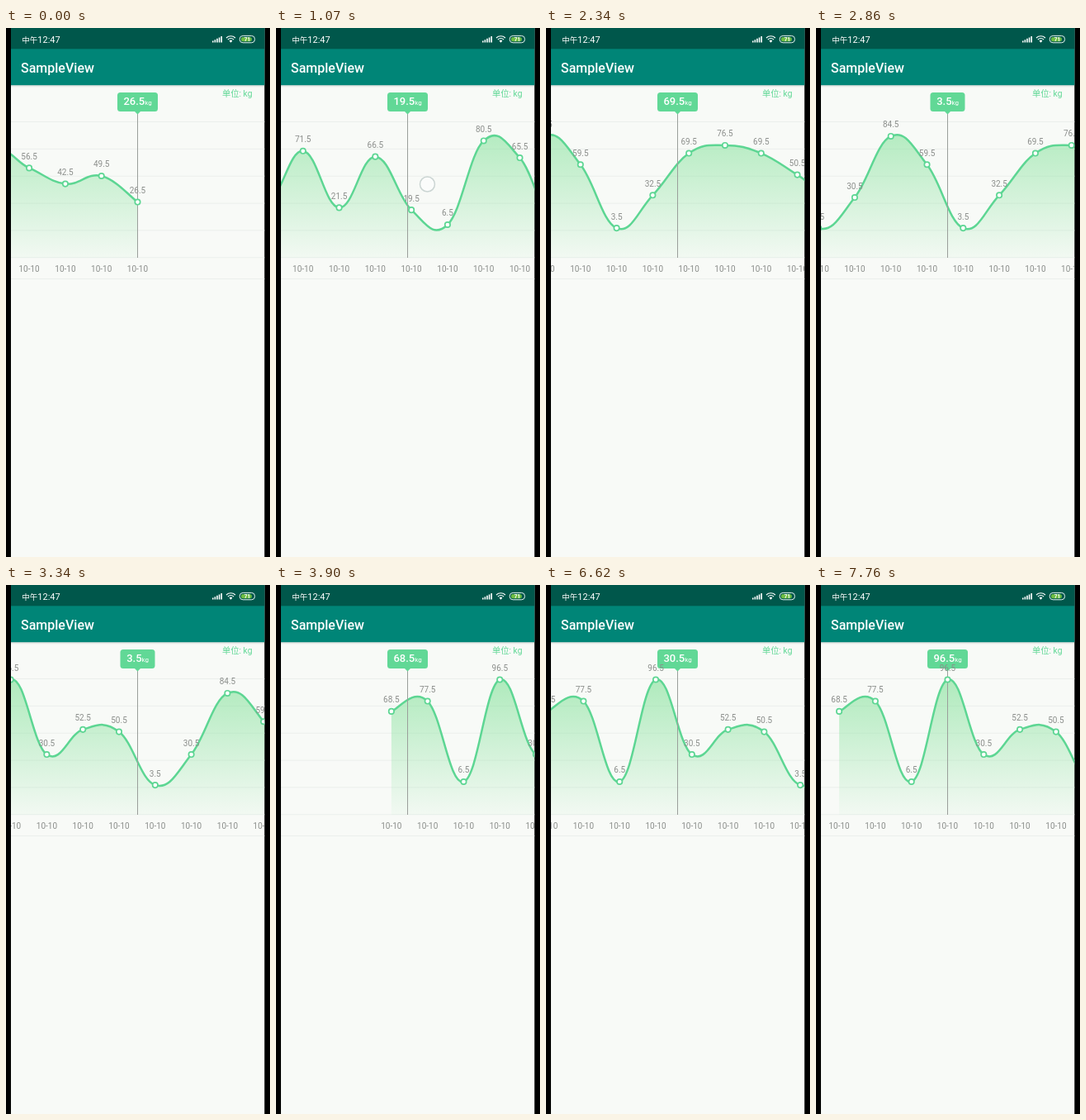
An HTML page for the animation above (8 s loop, 320x640 px).

```html
<!DOCTYPE html>
<html lang="zh">
<head>
<meta charset="utf-8">
<title>SampleView</title>
<style>
  html, body { margin: 0; width: 100%; height: 100%; overflow: hidden; background: #000; }
  svg { display: block; width: 100vw; height: 100vh; }
  text { font-family: Roboto, "Noto Sans CJK SC", "Noto Sans CJK", sans-serif; }
  .label { font-size: 10px; fill: #8b8e8b; text-anchor: middle; }
  .value { font-size: 13px; font-weight: 500; fill: #fff; text-anchor: middle; }
  .grid { stroke: #ebefec; }
  .dot { fill: #fff; stroke: #5dd693; stroke-width: 1.7; }
</style>
</head>
<body>
<svg viewBox="0 0 320 640">
  <defs>
    <linearGradient id="fade" gradientUnits="userSpaceOnUse" x1="0" y1="110" x2="0" y2="278">
      <stop offset="0" stop-color="#7fe096" stop-opacity=".62"/>
      <stop offset="1" stop-color="#7fe096" stop-opacity=".05"/>
    </linearGradient>
    <linearGradient id="shade" x1="0" y1="0" x2="0" y2="1">
      <stop offset="0" stop-color="#000" stop-opacity=".14"/>
      <stop offset="1" stop-color="#000" stop-opacity="0"/>
    </linearGradient>
    <clipPath id="screen"><rect x="6" width="307.3" height="640"/></clipPath>
  </defs>
  <g clip-path="url(#screen)">
    <rect width="320" height="640" fill="#f8faf7"/>
    <g id="grid"></g>
    <g class="scroll" id="curve"></g>
    <path d="M159.5 101V278" stroke="#9b9f9b"/>
    <g fill="#61d896">
      <rect id="bubble" y="78" height="23" rx="3.5"/>
      <path d="M155.5 100.5h8l-4 4z"/>
    </g>
    <text class="value" x="159.6" y="93"><tspan id="amount"></tspan><tspan font-size="8" font-weight="400">kg</tspan></text>
    <g class="scroll" id="points"></g>
    <text x="298.5" y="82.7" font-size="10.3" fill="#61d896" text-anchor="end">单位: kg</text>
    <rect y="69" width="320" height="3" fill="url(#shade)"/>
    <rect width="320" height="69.2" fill="#008577"/>
    <rect width="320" height="25.3" fill="#00574b"/>
    <text x="18" y="53.5" font-size="16" font-weight="500" fill="#fff">SampleView</text>
    <g fill="#fff">
      <text x="19.3" y="18" font-size="11"><tspan font-size="9.5">中午</tspan>12:47</text>
      <path d="M250 15.5h1.6v2H250zM252.6 14.2h1.6v3.3h-1.6zM255.2 12.8h1.6v4.7h-1.6zM257.8 11.4h1.6v6.1h-1.6zM260.4 10h1.6v7.5h-1.6z"/>
      <path d="M270.6 15.4a2.6 2.6 0 0 1 3.8 0l-1.9 2.3z"/>
      <path d="M267 12a8 8 0 0 1 11 0M268.9 14a5.4 5.4 0 0 1 7.2 0" fill="none" stroke="#fff" stroke-width="1.1"/>
      <rect x="283.2" y="9.4" width="18.4" height="8.4" rx="4" fill="none" stroke="#e4f0ed"/>
      <rect x="284.9" y="11" width="13" height="5.2" rx="2.5" fill="#6fbe45"/>
      <text x="292.4" y="15.9" font-size="6.5" font-weight="700" text-anchor="middle">71</text>
    </g>
    <circle id="touch" r="9" fill="#fff" fill-opacity=".55" stroke="#cbd5d3" stroke-width="1.5"/>
  </g>
</svg>
<script>
const LOOP = 8000, STEP = 43.8, CENTER = 159.5, BASE = 278, BEND = 0.2;

// the chart's readings, oldest first
const values = [68, 77, 6, 96, 30, 52, 50, 3, 30, 84, 59, 3, 32, 69, 76, 69, 50, 30, 36, 52, 32,
  55, 94, 79, 28, 71, 21, 66, 19, 6, 80, 65, 9, 69, 56, 42, 49, 26].map(v => v + 0.5);
const LAST = values.length - 1;

// a swipe drags for its first quarter, then flings to rest at index "to"
const swipe = (start, end, to, x, y) =>
  ({ start, end, to, x, y, down: start, up: start + (end - start) / 4, drag: STEP });
// a tap on the next point scrolls it to the center on release
const tap = (start, i) =>
  ({ start, end: start + 310, to: i + 1, x: CENTER + STEP + 4, y: 210, down: start - 100, up: start, drag: 0 });

const moves = [
  swipe(380, 980, 28.43, 100, 190),
  swipe(980, 1620, 21.6, 160, 189),
  swipe(1620, 2860, 10.57, 185, 282),
  swipe(2870, 4265, 0, 120, 210),
  ...[4520, 5240, 5760, 6480].map(tap),
  swipe(7140, 7760, 3, 140, 208)
];

const $ = id => document.getElementById(id);
const add = (parent, tag, attrs, text = '') => {
  const el = document.createElementNS('http://www.w3.org/2000/svg', tag);
  for (const key in attrs) el.setAttribute(key, attrs[key]);
  el.textContent = text;
  parent.append(el);
};
const clamp = (v, low, high) => Math.max(low, Math.min(high, v));

const xy = values.map((v, i) => [i * STEP, 246.9 - 1.372 * v]);
const at = i => xy[clamp(i, 0, LAST)];
const handle = (i, sign) => at(i).map((c, k) => c + sign * BEND * (at(i + 1)[k] - at(i - 1)[k]));

let line = 'M' + xy[0];
for (let i = 1; i <= LAST; i++) line += `C${handle(i - 1, 1)} ${handle(i, -1)} ${xy[i]}`;
add($('curve'), 'path', { d: `${line}V${BASE}H0Z`, fill: 'url(#fade)' });
add($('curve'), 'path', { d: line, fill: 'none', stroke: '#5dd693', 'stroke-width': 2.5 });
xy.forEach(([x, y], i) => {
  add($('points'), 'circle', { class: 'dot', cx: x, cy: y, r: 3.2 });
  add($('points'), 'text', { class: 'label', x, y: y - 10.5 }, values[i].toFixed(1));
  add($('points'), 'text', { class: 'label', x, y: 294.5 }, '10-10');
});
const rule = y => add($('grid'), 'path', { class: 'grid', d: `M6 ${y}H314` });
for (let i = 0; i < 6; i++) rule(113.5 + 32.85 * i);
rule(303.5);

const ease = u => 1 - (1 - u * u) ** 4;

// index of the reading under the center line
const position = time => moves.reduce((index, { start, end, to }) =>
  index + (to - index) * ease(clamp((time - start) / (end - start), 0, 1)), LAST);

function draw(time) {
  const index = position(time);
  const shift = `translate(${CENTER - index * STEP} 0)`;
  document.querySelectorAll('.scroll').forEach(g => g.setAttribute('transform', shift));

  const amount = values[Math.round(index)].toFixed(1);
  const width = amount.length > 3 ? 49 : 42;
  $('amount').textContent = amount;
  $('bubble').setAttribute('x', CENTER - width / 2);
  $('bubble').setAttribute('width', width);

  const touch = moves.find(({ down, up }) => time >= down && time < up);
  $('touch').style.display = touch ? '' : 'none';
  if (touch) {
    $('touch').setAttribute('cx', touch.x + touch.drag * (position(touch.start) - index));
    $('touch').setAttribute('cy', touch.y);
  }
}

const begin = performance.now();
function tick() {
  draw((performance.now() - begin) % LOOP);
  requestAnimationFrame(tick);
}
tick();
</script>
</body>
</html>
```
